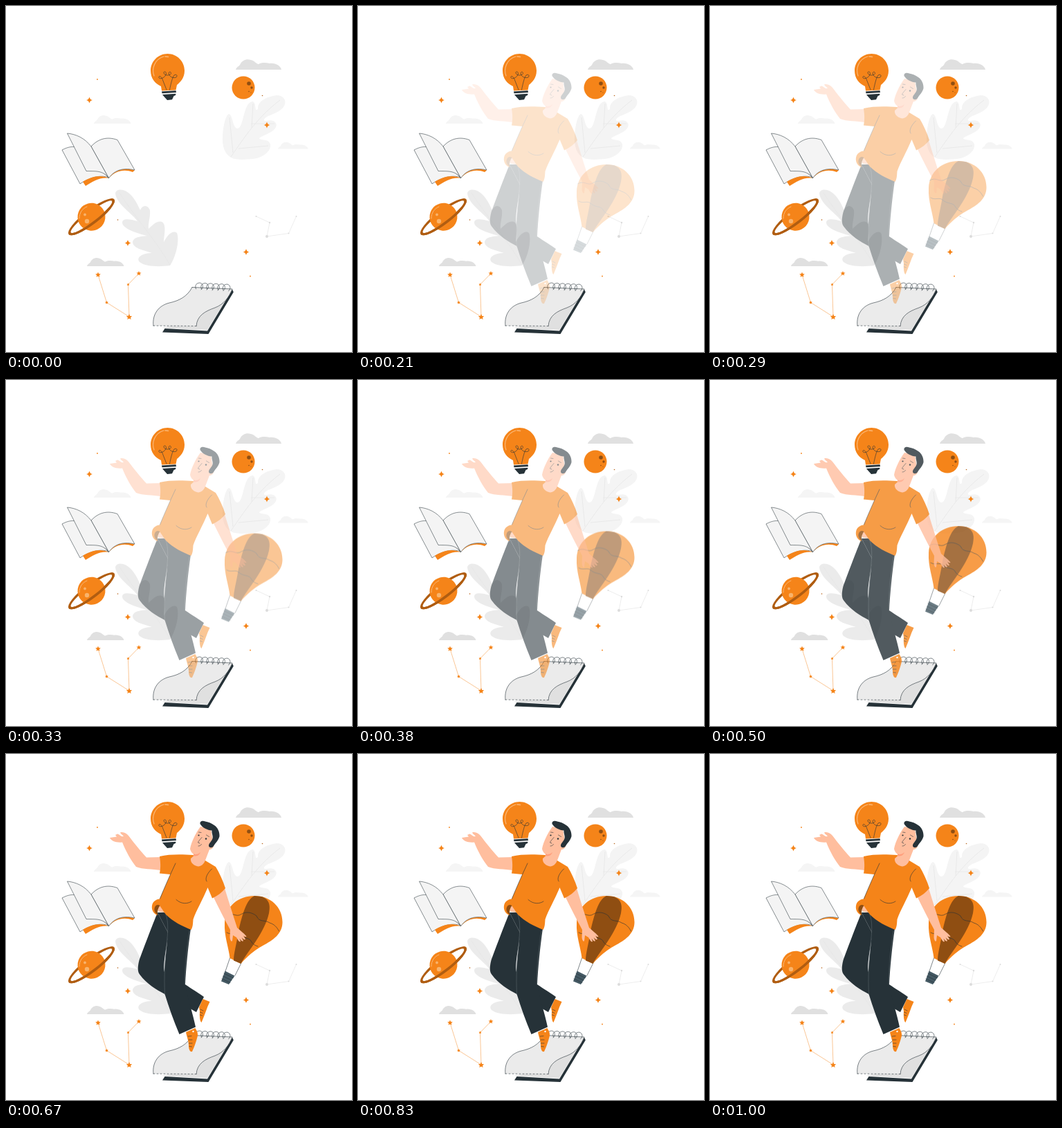
An HTML page for the animation above (1040 ms loop, 500 px wide and 500 px high).

```html
<!DOCTYPE html>
<html lang="en">
<head>
<meta charset="utf-8">
<title>Floating ideas</title>
<style>
  html, body { margin: 0; width: 100%; height: 100%; overflow: hidden; background: #fff; }
  svg { display: block; width: 100vw; height: 100vh; }
  .orange { fill: #f58419; }
  .brown { fill: #8f4e12; }
  .dark { fill: #263238; }
  .skin { fill: #ffbe9e; }
  .line { fill: none; stroke: #263238; stroke-width: .6; stroke-linecap: round; stroke-linejoin: round; }
  .page { fill: #f4f4f4; stroke: #263238; stroke-width: .55; stroke-linejoin: round; }
  .glow { fill: none; stroke: #fbb876; stroke-linecap: round; }
  .vein { fill: none; stroke: #e6e6e6; stroke-width: .8; }
  .fade { animation: fade 1040ms linear infinite; }
  .rise { animation: fade 1040ms linear infinite, rise 1040ms linear infinite; }
  @keyframes fade {
    0%, 3.846% { opacity: 0; }
    7.692% { opacity: .02; }
    20.192% { opacity: .22; }
    57.692%, 100% { opacity: 1; }
  }
  @keyframes rise {
    0%, 7.692% { transform: translateY(32px); }
    57.692%, 100% { transform: translateY(0); }
  }
</style>
</head>
<body>
<svg viewBox="0 0 500 500">
  <defs>
    <path id="cloud" d="M0 0C1-4 5-5 6-7C9-14 16-16 22-14C27-13 30-8 33-8C38-11 44-10 49-9C58-10 65-5 66 0Z"/>
    <path id="spark" d="M0-4.6C1-1.6 1.6-1 4.6 0C1.6 1 1 1.6 0 4.6C-1 1.6-1.6 1-4.6 0C-1.6-1-1-1.6 0-4.6Z"/>
    <path id="star" d="M0-4L1.1-1.4L3.8-1.2L1.8.6L2.4 3.2L0 1.8L-2.4 3.2L-1.8.6L-3.8-1.2L-1.1-1.4Z"/>
    <path id="coil" class="line" d="M-5.500 8.500C-8 3 -4-.5 .5-.2C5 1 6 7 2 9.500"/>
  </defs>

  <!-- leaves -->
  <path fill="#f4f4f4" d="M325 219C316 214 312 202 313 188C314 174 317 158 322 156C328 157 327 175 334 177C344 178 342 140 356 138C363 139 358 154 364 149C363 138 376 131 391 129C400 129 405 135 403 142C400 152 385 156 377 160C371 164 372 167 377 166C386 163 393 169 390 175C387 183 370 187 366 191C367 195 380 191 382 200C383 210 372 219 357 221C346 222 333 223 325 219Z"/>
  <path class="vein" d="M325 218C345 189 364 160 396 136M323 161L328 212M357 141L355 176M336 206L379 202M354 170L388 170"/>
  <path fill="#ebebeb" d="M158 271C159 264 169 264 177 270C186 277 190 287 194 295C197 287 205 287 208 295C209 305 205 314 206 322C212 316 220 308 227 313C232 320 228 332 228 341C233 331 241 323 247 328C251 338 246 362 237 375C222 377 202 377 193 370C187 363 198 357 211 357C199 353 183 350 183 341C184 334 194 333 204 332C191 329 168 322 168 313C168 306 180 308 190 311C182 299 160 287 158 271Z"/>
  <path class="vein" d="M164 270C187 306 216 338 237 374"/>

  <!-- clouds -->
  <use href="#cloud" transform="translate(332 92)" fill="#e0e0e0"/>
  <use href="#cloud" transform="translate(117 376) scale(.81)" fill="#e0e0e0"/>
  <use href="#cloud" transform="translate(127 170) scale(.81)" fill="#f5f5f5"/>
  <use href="#cloud" transform="translate(393 206.5) scale(.66)" fill="#f5f5f5"/>

  <!-- sparks and dots -->
  <g class="orange">
    <use href="#spark" x="120.5" y="136"/>
    <use href="#spark" x="377" y="172"/>
    <use href="#spark" x="176" y="342.5"/>
    <use href="#spark" x="347" y="355.5"/>
    <circle cx="132" cy="106" r=".9"/>
    <circle cx="353" cy="390.5" r=".9"/>
  </g>
  <g fill="#b5641a">
    <circle cx="161.5" cy="309" r=".8"/>
    <circle cx="370.5" cy="129.5" r=".8"/>
  </g>

  <!-- constellations -->
  <g class="orange">
    <path fill="none" stroke="#f8ae68" stroke-width=".7" d="M133 388.5L145.5 428.5L178 449L176.5 402.5L192 386.5"/>
    <use href="#star" transform="translate(133 388.5)"/>
    <use href="#star" transform="translate(145.5 428.5) scale(.65)"/>
    <use href="#star" transform="translate(178 449.5) scale(1.1)"/>
    <use href="#star" transform="translate(176.5 402.5) scale(.55)"/>
    <use href="#star" transform="translate(192 386.5) scale(.9)"/>
  </g>
  <g fill="#dcdcdc">
    <path fill="none" stroke="#e6e6e6" stroke-width=".7" d="M361.5 304L381 313L377 333L408.5 328.5L419.5 304"/>
    <circle cx="361.5" cy="304" r="1"/>
    <circle cx="381" cy="313" r="1.2"/>
    <circle cx="377" cy="333" r="2.1"/>
    <circle cx="408.5" cy="328.5" r="1"/>
    <circle cx="419.5" cy="304" r="1"/>
  </g>

  <!-- light bulb -->
  <path class="orange" d="M233.500 69C247 69 258 80 258 93.500C258 104 252 110 247 114L245.500 121.500L225 122.500L224 116C215 112 209 104 209 93.500C209 80 220 69 233.500 69Z"/>
  <path class="line" stroke-width=".5" d="M232 121L226.500 107C224.500 101 220.500 100 221 103.500C222 106.500 230 104 231.500 98C231.500 94 227.500 94 228 97C229.500 101 237 101 238.500 97.500C238.500 94.500 235 94.500 235.200 97.500C236 102 241 105 246 103C248.500 100.500 246 98 243 100C240.500 103 238.500 111 236.500 121"/>
  <path class="glow" stroke-width="1.2" d="M214 101C210 90 215 77 228 73"/>
  <path class="glow" stroke-width="1.6" d="M230 73L234.5 73.5"/>
  <path class="dark" d="M225 123.500L245.500 122.200L246 125L225.500 126.300ZM226 128L245.500 126.800L245 129L242.500 130L240 135.200L233 136L228.500 131Z"/>

  <!-- cratered planet -->
  <circle class="orange" cx="343" cy="118" r="16.5"/>
  <g class="brown">
    <circle cx="351" cy="112" r="2.8"/>
    <circle cx="355" cy="118" r="1.7"/>
    <circle cx="351" cy="123.5" r=".8"/>
    <circle cx="354" cy="125" r=".5"/>
  </g>

  <!-- book -->
  <path class="page" d="M81 208C87 205 92 203 99 203.500L148.500 248C135 243 119 249 107 257Z"/>
  <path class="orange" d="M111 254C122 247 136 243 148.500 248.800C135 247 125 254 115 260ZM148.500 248.800C158 235 174 234 186 237.500L183 240C171 235 158 238 148.500 248.800Z"/>
  <path class="page" d="M123 203C133 192 146 188 161 193.500L186 237C172 234 158 235 148.500 248.800Z"/>
  <path class="page" d="M88.500 184C101 185 114 191 123 203L148.500 248.800C140 237 129 239 116 238.500Z"/>

  <!-- ringed planet -->
  <g transform="translate(123.5 304.7) rotate(-37.5)">
    <path fill="#b05d11" fill-rule="evenodd" d="M-41.500 0A41.500 10.500 0 0 1 41.500 0A41.500 10.500 0 0 1-41.500 0ZM-37.500 0A37.500 6.800 0 0 0 37.500 0A37.500 6.800 0 0 0-37.500 0Z"/>
    <circle class="orange" r="20"/>
    <path fill="#b05d11" d="M-41.500 0A41.500 10.500 0 0 0 41.500 0L37.500 0A37.500 6.800 0 0 1-37.500 0Z"/>
  </g>
  <path class="glow" stroke-width="1" d="M106 307C106 299 110 293 117 290"/>
  <g fill="#f9b36b">
    <circle cx="114" cy="301.5" r="1.9"/>
    <circle cx="117" cy="311" r="3.2"/>
  </g>

  <!-- notepad -->
  <path class="dark" d="M229.500 466L291 469.500L327 409.500L328.800 413.500L292.500 474L226 471.500Z"/>
  <path fill="#e0e0e0" d="M269 406.500L327.500 409L291 468.500L225 465L270 455Z"/>
  <path fill="#ebebeb" d="M269 406.500L327 409C322 421 315 431 302 436C288 441 276 447 275 462.500L213 462C211 446 220 433 236 429C250 426 262 420 269 406.500Z"/>
  <path class="line" d="M269 406.500L327 409C322 421 315 431 302 436C288 441 276 447 275 462.500M269 406.500C262 420 250 426 236 429C220 433 211 446 213 462"/>
  <path class="line" stroke-dasharray="2 3" d="M213 462L275 462.500"/>
  <use href="#coil" x="280" y="400.3"/>
  <use href="#coil" x="288" y="400.7"/>
  <use href="#coil" x="296" y="401.1"/>
  <use href="#coil" x="304" y="401.5"/>
  <use href="#coil" x="312" y="401.9"/>
  <use href="#coil" x="319.5" y="402.3"/>

  <!-- balloon -->
  <g class="rise">
    <path class="orange" d="M323.500 295C322 280 315 263 316 244C317 220 336 205 359 205C382 205 399.500 221 399.500 243C399.500 260 386 269 371 277C358 284 347 294 339.500 303Z"/>
    <path class="brown" d="M359 205C347 210 341 234 336 256C333 276 329 288 329 298.500L339.500 303C350 284 374 258 380 230C383 215 378 209 369 206Z"/>
    <path class="line" d="M317.500 233C327 227 332 237 340 231.500C347 227 356 229 362 234C366 244 374 239 381 244C388 246 392 251 394.500 256M319 258C325 262 331 257 336 261C343 268 352 264 355 272C358 276 361 277 364 278M323.500 295L317 314M339.500 303L331 320"/>
    <path fill="#455a64" d="M316.500 313.500L330.500 320.500L322 333L311 328.500Z"/>
    <path class="line" stroke-width=".5" d="M315 317L328.500 323.500M313.500 321L326 327M312 325L324 330.500"/>
  </g>

  <!-- person -->
  <g class="fade">
    <path class="skin" d="M224 149L203 149.500C194 140 184 127 177 118C174 115 170 112 165 113.500C166 116 169 117 170 119C166 120 164 116 161 115.500L158 117L160 119.500L150 121C152 126 160 128.500 168 127.500C173 140 180 153 188 163C198 167 211 166 224 168Z"/>
    <path class="skin" d="M299 205L316 194C322 214 329 235 334 251C338 255 343 258 347.500 263.500C347 265 345 264 343 262.500L346 267.500C345 269 343 268 340.500 265L343 270C341.500 271.500 340 270 337.500 266.500L339 271C337 272.500 335.500 269 333 265L328 262L327 270C325.500 272 324 269 323.500 265L324 254C317 241 307 222 299 205Z"/>

    <!-- trousers -->
    <path class="dark" d="M219 229C212 246 198 283 192.500 298C190 308 190 315 193.500 319C203 332 218 341 229.500 347L275 373L286 351C275 343 263 336 256 331L230 318C226 309 230 288 235 260Z"/>
    <path class="dark" d="M219 229L232 229L267 252C263 280 260 310 259 333C263 355 270 375 274 394.500L250.500 405C242 385 235 365 229.500 347C226 325 232 285 234 258Z"/>
    <path class="line" style="stroke:#59656b" d="M231 232C235 242 234 258 232 276C230 296 228 322 229.500 347M265 256C261 285 258 310 258.500 333"/>

    <!-- shoes -->
    <path class="orange" d="M284.500 354L294.500 358C290 367 287 378 282.500 388C280 386 279.500 378 280 372L279 366Z"/>
    <path class="line" d="M281 369L285 371M280.500 373L284 374.500M280.500 377L283.500 378"/>
    <path class="orange" d="M260 402L273.500 396C275 399 277.500 402 277 407C275 415 272 424 269 430C266 431 264 427 264 421C264 414 261 408 260 402Z"/>
    <path class="line" d="M263 408L268 407.500M264 413L269 413M264.500 418L269 418M265 422.500L268.500 423"/>
    <circle cx="270.5" cy="401" r="1.2" fill="#fff"/>

    <!-- shirt -->
    <path class="skin" d="M219 219L224 219L233 230L220 227.500Z"/>
    <path class="orange" d="M222 148C236 144.500 255 145 270 146L288 154L303 163C308 171 314 184 317 194C312 200 306 205 298 208.500L291.500 193C284 211 275 226 270.500 239C270 246 270 250 267.500 254C255 249 241 242 231 232L222 219C219 219 218 228 219 233C213 231 210 225 211 219C212 213 217 210 222 209.500L237.500 174L222 172.500C224 163 223 155 222 148Z"/>
    <path class="brown" d="M222.500 219C217 216 214 221 214.500 226C215 229 217 231 219 232C218.500 227 220 222 222.500 219Z"/>
    <path class="line" stroke-width=".9" d="M245 158C237 175 229 193 222.500 209M246 210.500C253 217 262 217 268 213M297.500 166C291 172 287 180 290 184"/>

    <!-- head -->
    <path class="skin" d="M281 105C275 113 268 126 266 137C267 142 270 144 272.500 146L267 151C266 157 272 162 278 162.500C284 162 287 157 289 151L294 138C300 138 302 131 299 127L296 108Z"/>
    <path fill="#ff9f7d" d="M271 144.500C275 145.500 278 144.500 281 142C279 147 275 148 271 147.500Z"/>
    <path class="dark" d="M280.500 101C280 97 284 96 288 97.500C292 98 297 100 301 103C306 106 309 113 308.500 119C307 125 303 128 300 133C298 136 294 136 293 133C292.500 129 297 127 298.500 122C299.500 118 297 115 297.500 110.500C291 110 284 107 280.500 101Z"/>
    <circle class="dark" cx="278.5" cy="117.5" r="1.1"/>
    <circle class="dark" cx="289" cy="122.5" r="1.2"/>
    <path class="line" stroke-width=".9" d="M278.500 113L282 113.500M289.500 117L293.500 119.500M283 120.500C281 123 278 126 277.500 128L280 129M278 133C280 133 281.500 132 282.500 130.500"/>
  </g>
</svg>
</body>
</html>
```
